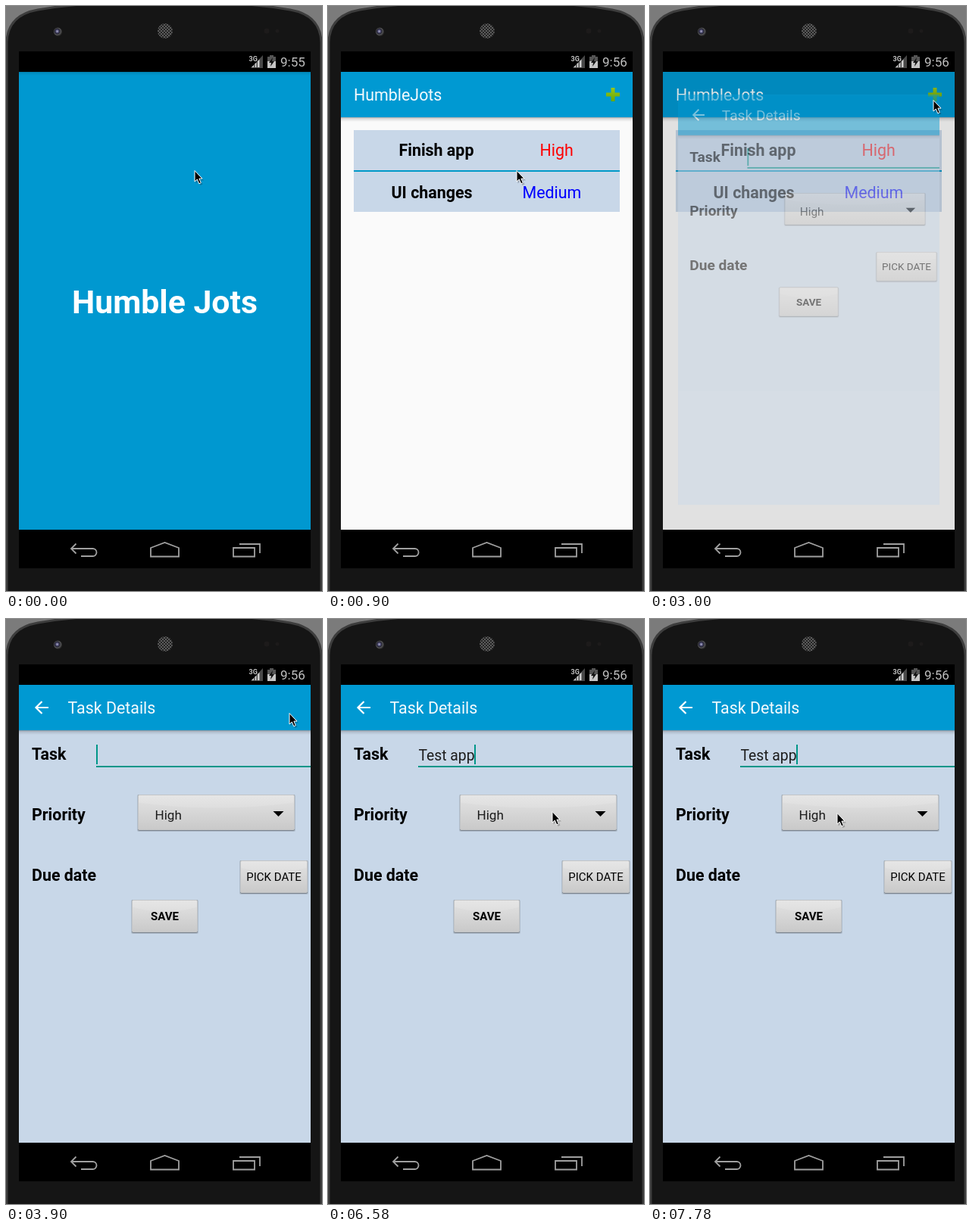
An HTML page that plays this animation: 417x773 px, repeating every 8000 ms.

```html
<!DOCTYPE html>
<html lang="en">
<head>
<meta charset="utf-8">
<title>Task list demo</title>
<style>
  html, body { margin: 0; width: 100%; height: 100%; overflow: hidden; background: #151515; }
  svg { display: block; width: 417px; height: 773px; font-family: Roboto, "Noto Sans", sans-serif; }
  text { white-space: pre; }
  .title { font-size: 21.4px; fill: #f4fafd; }
  .label { font-size: 21.4px; font-weight: 700; }
  .value { font-size: 21.4px; }
  .item { font-size: 17.1px; fill: #1c1c1c; }
  .button { font-size: 15px; text-anchor: middle; }
  .nav { fill: none; stroke: #a0a0a0; stroke-width: 1.8; }
</style>
</head>
<body>
<svg viewBox="0 0 417 773">
  <defs>
    <linearGradient id="drop" x2="0" y2="1">
      <stop stop-color="#000" stop-opacity=".34"/>
      <stop offset=".3" stop-color="#000" stop-opacity=".13"/>
      <stop offset="1" stop-color="#000" stop-opacity="0"/>
    </linearGradient>
    <linearGradient id="metal" x2="0" y2="1">
      <stop stop-color="#e2e2e2"/>
      <stop offset=".45" stop-color="#d8d8d8"/>
      <stop offset="1" stop-color="#c9c9c9"/>
    </linearGradient>
    <linearGradient id="leaf" x2="0" y2="1">
      <stop stop-color="#98c61c"/>
      <stop offset="1" stop-color="#69a800"/>
    </linearGradient>
    <radialGradient id="lens" cx=".42" cy=".45">
      <stop stop-color="#b9b8c8"/>
      <stop offset=".3" stop-color="#5c5a86"/>
      <stop offset=".6" stop-color="#22222e"/>
      <stop offset=".85" stop-color="#5a5a5c"/>
      <stop offset="1" stop-color="#333"/>
    </radialGradient>
    <pattern id="mesh" width="4" height="4" patternUnits="userSpaceOnUse">
      <rect width="4" height="4" fill="#242424"/>
      <circle cx="1" cy="1" r=".9" fill="#767676"/>
      <circle cx="3" cy="3" r=".9" fill="#767676"/>
    </pattern>
    <clipPath id="window"><rect x="17" y="87" width="385" height="605"/></clipPath>
  </defs>

  <!-- phone body -->
  <rect width="417" height="773" fill="#7b7b7b"/>
  <path d="M1 775V48Q2 12 42 5Q82 -2 120 -3H297Q335 -2 375 5Q415 12 416 48V775Z" fill="#151515" stroke="#3d3d3d" stroke-width="3"/>
  <circle cx="68.5" cy="34" r="5.5" fill="url(#lens)"/>
  <circle cx="210" cy="33" r="10" fill="url(#mesh)"/>
  <circle cx="344" cy="33" r="3.5" fill="#1d1b1b"/>
  <circle cx="358" cy="33" r="2.5" fill="#1d1b1b"/>
  <rect x="17" y="60" width="385" height="683"/>

  <!-- status bar -->
  <text x="320.5" y="73" font-size="9" font-weight="700" fill="#c4c4c4">3G</text>
  <path d="M339 65V82H323Z" fill="#484848"/>
  <path d="M324 81l3-3v3zM328.5 81v-4.5l2-2V81zM332 81v-8l2.5-2.5V81z" fill="#cfcfcf"/>
  <path d="M348 65h5v2h3v15h-11V67h3z" fill="#555"/>
  <path d="M345 73h11v9h-11z" fill="#c6c6c6"/>
  <path d="M352 68l-5 7h3l-1 5 5-7h-3z" fill="#111"/>
  <text id="clock" x="362" y="80" font-size="17.1" fill="#c0c0c0"></text>

  <!-- navigation bar -->
  <g class="nav">
    <path d="M92.5 710.5L86 717l6.5 6.500M86 717h28.5a5 5 0 0 1 0 10H99"/>
    <path d="M191 727.5V716l18.5-7L228 716v11.5Z"/>
    <path d="M300 716h28v11.5h-28ZM308 711h27v12"/>
  </g>

  <g clip-path="url(#window)">
    <g id="splash">
      <rect x="17" y="87" width="385" height="605" fill="#0098d0"/>
      <rect x="17" y="87" width="385" height="5" fill="url(#drop)" opacity=".6"/>
      <text x="209.5" y="406" font-size="42.8" font-weight="700" fill="#fff" text-anchor="middle">Humble Jots</text>
    </g>
    <rect class="shade" x="17" y="87" width="385" height="605"/>

    <g id="list">
      <rect x="17" y="87" width="385" height="605" fill="#fafafa"/>
      <rect x="17" y="87" width="385" height="60" fill="#0099d2"/>
      <rect x="17" y="147" width="385" height="6" fill="url(#drop)"/>
      <text class="title" x="34" y="125">HumbleJots</text>
      <path d="M373.5 108h5v6.5h6.5v5h-6.5v6.5h-5v-6.5h-6.5v-5h6.5z" fill="url(#leaf)"/>
      <rect x="34" y="164" width="351" height="108" fill="#c8d7e8"/>
      <rect x="34" y="217" width="351" height="2" fill="#0099c8"/>
      <text class="label" x="93.5" y="198">Finish app</text>
      <text class="value" x="279.5" y="198" fill="#f00">High</text>
      <text class="label" x="83.5" y="254">UI changes</text>
      <text class="value" x="256.5" y="254" fill="#00f">Medium</text>
    </g>
    <rect class="shade" x="17" y="87" width="385" height="605"/>

    <g id="detail">
      <rect x="17" y="87" width="385" height="605" fill="#c8d7e8"/>
      <rect x="17" y="87" width="385" height="60" fill="#0099d2"/>
      <rect x="17" y="147" width="385" height="6" fill="url(#drop)"/>
      <path d="M56 117H40M47.5 109L39.5 117l8 8" fill="none" stroke="#fff" stroke-width="2.2"/>
      <text class="title" x="81.5" y="125">Task Details</text>
      <text class="label" x="34" y="186">Task</text>
      <text class="label" x="34" y="266">Priority</text>
      <text class="label" x="34" y="346">Due date</text>
      <rect x="119" y="194" width="283" height="2" fill="#009688"/>
      <text id="entry" x="119.5" y="187" font-size="19.3" fill="#1c1c1c"></text>
      <rect id="caret" y="166" width="2" height="26" fill="#009688"/>
      <g id="buttons"></g>
      <text class="item" x="196.5" y="265">High</text>
      <path d="M352.5 254h14l-7 7z"/>
      <text class="button" x="353.5" y="346">PICK DATE</text>
      <text class="button" x="209.5" y="398" font-weight="700">SAVE</text>
    </g>

    <g id="menu">
      <rect x="184" y="231" width="188" height="159" rx="4" opacity=".1"/>
      <rect x="186" y="232" width="184" height="156" rx="3" opacity=".2"/>
      <rect x="187" y="232" width="182" height="154" rx="2" fill="#fafafa"/>
      <text class="item" x="197" y="265">High</text>
      <text class="item" x="197" y="316">Medium</text>
      <text class="item" x="197" y="367">Low</text>
    </g>
  </g>

  <g id="pointer">
    <path d="M1.5 2v15l3.5-3 2.5 5.5 3-1.5-2.5-5H12z" opacity=".22"/>
    <path d="M0 0V14.5L3.3 11.5 5.8 17.3 8.3 16.2 5.9 10.6H10Z" stroke="#fff"/>
  </g>
</svg>
<script>
const LOOP = 8000;
const $ = id => document.getElementById(id);

// Each row: start time in ms, then the values held from there on.
const listSteps = [[0, 0, 0], [600, .48, .1], [750, .875, .5], [900, 1, 0]];
const detailSteps = [[0, 0, 0], [3000, .48, .1], [3150, .875, .5], [3300, .98, .5], [3450, 1, 0]];
const entrySteps = [[0, ""], [4200, "T"], [4350, "Te"], [4500, "Tes"], [4640, "Test"],
  [4940, "Test a"], [5090, "Test ap"], [5240, "Test app"]];
const caretSteps = [[0, 1], [3450, 0], [3900, 1]];
const menuSteps = [[0, 0], [6730, .8], [6880, 1], [7630, .4], [7780, 0]];
const clockSteps = [[0, "9:55"], [900, "9:56"]];
const pointerSteps = [[0, 249, 217],
  [1500, 230, 221], [1650, 204, 224], [1800, 226, 212], [1950, 275, 186],
  [2100, 325, 154], [2250, 362, 131], [2400, 376, 124], [2550, 374, 124],
  [5690, 370, 134], [5840, 352, 168], [5990, 334, 204], [6140, 319, 232],
  [6280, 307, 247], [6430, 300, 253], [6580, 296, 254],
  [6880, 278, 255], [7030, 258, 256], [7180, 247, 256]];

const at = (steps, t) => steps.findLast(s => s[0] <= t).slice(1);
const shades = document.querySelectorAll(".shade");

function button(x, y, w, h) {
  return `<rect x="${x - 1}" y="${y}" width="${w + 2}" height="${h + 2}" rx="2" opacity=".12"/>
    <rect x="${x}" y="${y}" width="${w}" height="${h + 1}" rx="2" opacity=".3"/>
    <rect x="${x + .5}" y="${y + .5}" width="${w - 1}" height="${h - 1}" rx="1.5" fill="url(#metal)" stroke="#c2c4c6"/>
    <path d="M${x + 1} ${y + 1}h${w - 2}v${h * .2}q${1 - w / 2} ${h * .3} ${2 - w} 0z" fill="#fff" opacity=".12"/>`;
}
$("buttons").innerHTML = button(174, 232, 207, 47) + button(309, 319, 89, 43) + button(166, 371, 87, 43);

// A screen opens by growing from 80% while it fades in over a darkening one.
// Its centre includes the strip behind the status bar.
function openScreen(id, shade, [p, dim]) {
  const size = .8 + .2 * p;
  $(id).setAttribute("opacity", p);
  $(id).setAttribute("transform", `translate(209.5 376) scale(${size}) translate(-209.5 -376)`);
  shade.setAttribute("opacity", dim);
}

function draw(t) {
  openScreen("list", shades[0], at(listSteps, t));
  openScreen("detail", shades[1], at(detailSteps, t));
  $("clock").textContent = at(clockSteps, t)[0];
  const entry = $("entry");
  entry.textContent = at(entrySteps, t)[0];
  const width = entry.textContent ? entry.getComputedTextLength() : 0;
  $("caret").setAttribute("x", Math.round(119 + width));
  $("caret").setAttribute("opacity", at(caretSteps, t)[0]);
  $("menu").setAttribute("opacity", at(menuSteps, t)[0]);
  const [x, y] = at(pointerSteps, t);
  $("pointer").setAttribute("transform", `translate(${x} ${y + .5})`);
}

const start = performance.now();
function tick() {
  draw((performance.now() - start) % LOOP);
  requestAnimationFrame(tick);
}
tick();
</script>
</body>
</html>
```
